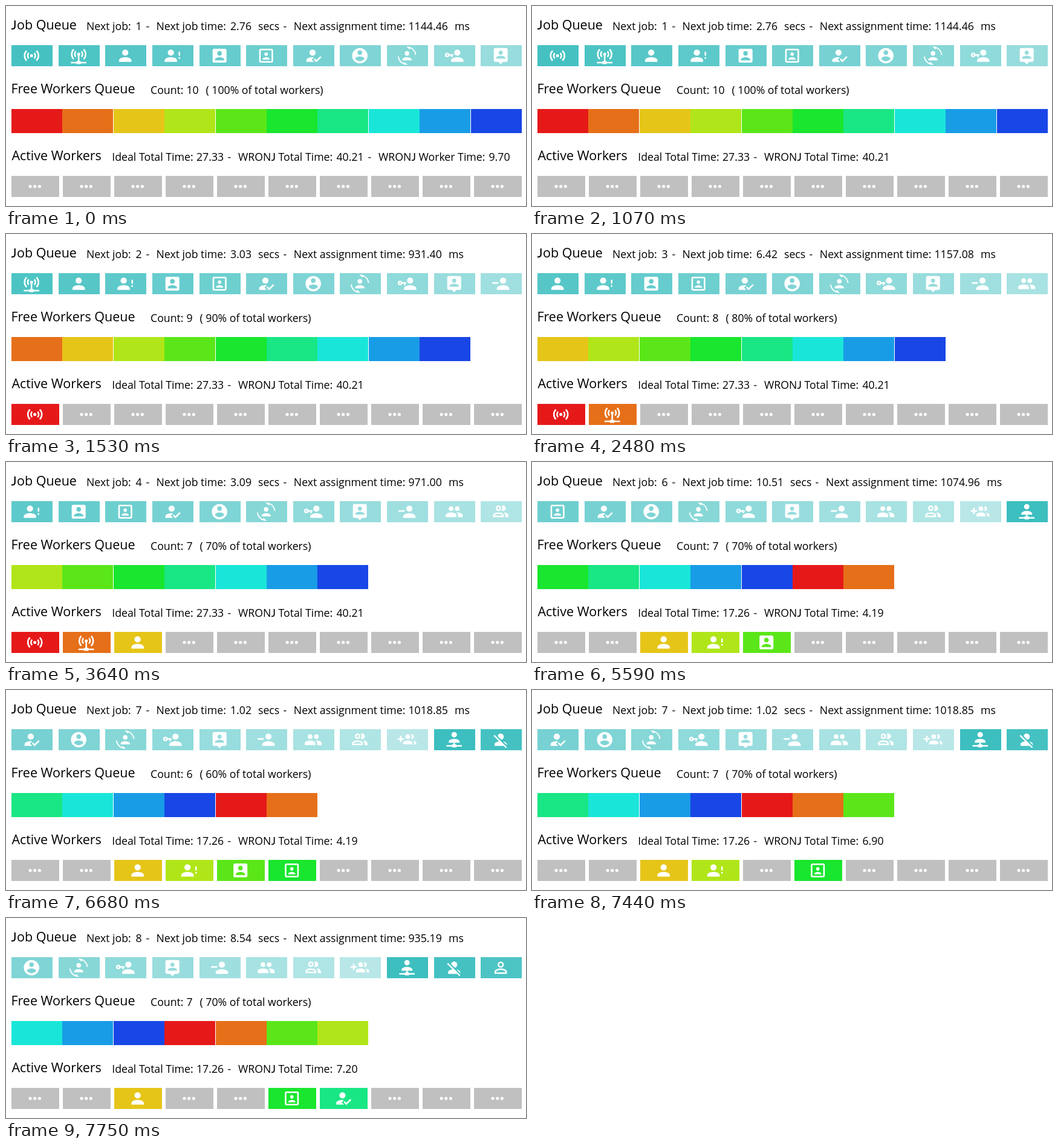
Animation of 860x332 px, one loop 8000 ms. Source, as an HTML page:

```html
<!DOCTYPE html>
<html lang="en">
<head>
<meta charset="utf-8">
<title>Job queue</title>
<style>
  html, body { margin: 0; width: 100%; height: 100%; overflow: hidden; background: #fff; }
  svg { display: block; }
  text { font: 17.7px "Open Sans", "Noto Sans", sans-serif; fill: #000; white-space: pre; }
  text.title { font-size: 21.5px; }
  .j { font-family: Lato, sans-serif; }
  .icon { fill: #fff; fill-rule: evenodd; }
  .line { fill: none; stroke: #fff; stroke-width: 2; }
</style>
</head>
<body>
<svg id="stage" width="860" height="332" viewBox="0 0 860 332"></svg>
<script>
const LOOP = 8000, WORKERS = 10, QUEUE = 11, DIGIT = 10.1;

// Icons on a 24-unit grid
const path = d => `<path d="${d}"/>`;
const rect = (x, y, w, h) => `<rect x="${x}" y="${y}" width="${w}" height="${h}"/>`;
const dot = (x, y, r) => `<circle cx="${x}" cy="${y}" r="${r}"/>`;
const person = x => dot(x, 8, 4) + path(`M${x} 14c4.42 0 8 1.79 8 4v2h-16v-2c0-2.21 3.58-4 8-4z`);
const slimPerson = x => dot(x, 8, 4) + path(`M${x} 14c-2.67 0-8 1.34-8 4v2h16v-2c0-2.66-5.33-4-8-4z`);
const bust = 'M15 9c0 1.66-1.34 3-3 3s-3-1.34-3-3 1.34-3 3-3 3 1.34 3 3zm-9 8c0-2 4-3.1 6-3.1s6 1.1 6 3.1v1H6z';
const waves = y => {
  const arc = (r, side) => {
    const k = r * Math.SQRT1_2;
    return `M${12 + side * k} ${y - k}A${r} ${r} 0 0 ${side > 0 ? 1 : 0} ${12 + side * k} ${y + k}`;
  };
  return dot(12, y, 2) + `<path class="line" d="${arc(5, 1)}${arc(5, -1)}${arc(9, 1)}${arc(9, -1)}"/>`;
};
const network = (top, y) => path(`M11 ${top}V${y}h-1a1 1 0 0 0-1 1H2v2h7a1 1 0 0 0 1 1h4a1 1 0 0 0 1-1h7v-2h-7a1 1 0 0 0-1-1h-1V${top}z`);

const ICONS = [
  waves(12),
  waves(10) + network(11, 19),
  person(12),
  person(10) + rect(20, 7, 2, 5) + rect(20, 14, 2, 2),
  path('M3 5v14a2 2 0 0 0 2 2h14c1.1 0 2-.9 2-2V5c0-1.1-.9-2-2-2H5a2 2 0 0 0-2 2z' + bust),
  path('M12 12.25c1.24 0 2.25-1.01 2.25-2.25S13.24 7.75 12 7.75 9.75 8.76 9.75 10s1.01 2.25 2.25 2.25zm4.5 4c0-1.5-3-2.25-4.5-2.25s-4.5.75-4.5 2.25V17h9v-.75zM19 3H5c-1.1 0-2 .9-2 2v14c0 1.1.9 2 2 2h14c1.1 0 2-.9 2-2V5c0-1.1-.9-2-2-2zm0 16H5V5h14v14z'),
  path('M21.1 12.5l1.4 1.41-6.53 6.59L12.5 17l1.4-1.41 2.07 2.08zM10 17l3 3H3v-2c0-2.21 3.58-4 8-4l1.89.11z') + dot(11, 8, 4),
  path('M12 2C6.48 2 2 6.48 2 12s4.48 10 10 10 10-4.48 10-10S17.52 2 12 2zm0 3c1.66 0 3 1.34 3 3s-1.34 3-3 3-3-1.34-3-3 1.34-3 3-3zm0 14.2c-2.5 0-4.71-1.28-6-3.22.03-1.99 4-3.08 6-3.08 1.99 0 5.97 1.09 6 3.08-1.29 1.94-3.5 3.22-6 3.22z'),
  path('M7.5 21.5l1.35-1.34 3.81 3.81L12 24C5.71 24 .56 19.16.05 13h1.5c.36 3.76 2.7 6.94 5.95 8.5zM16.5 2.5l-1.35 1.34L11.34.03 12 0c6.29 0 11.44 4.84 11.95 11h-1.5c-.36-3.76-2.7-6.93-5.95-8.5z' + bust),
  slimPerson(16) + `<circle class="line" cx="3" cy="11" r="2"/>` + rect(5, 10, 6, 2) + rect(8, 12, 2, 2),
  path('M19 2H5c-1.1 0-2 .9-2 2v14c0 1.1.9 2 2 2h4l3 3 3-3h4c1.1 0 2-.9 2-2V4c0-1.1-.9-2-2-2zm-7 3.3c1.49 0 2.7 1.21 2.7 2.7s-1.21 2.7-2.7 2.7-2.7-1.21-2.7-2.7 1.21-2.7 2.7-2.7zM18 16H6v-.9c0-2 4-3.1 6-3.1s6 1.1 6 3.1v.9z'),
  slimPerson(15) + rect(1, 10, 8, 2),
  dot(16, 8, 3) + dot(8, 8, 3) +
    path('M8 13c-2.33 0-7 1.17-7 3.5V19h14v-2.5c0-2.33-4.67-3.5-7-3.5zm8 0c-.29 0-.62.02-.97.05 1.16.84 1.97 1.97 1.97 3.45V19h6v-2.5c0-2.33-4.67-3.5-7-3.5z'),
  '<circle class="line" cx="9" cy="7.5" r="2.5"/>' +
    path('M13.07 10.41a5 5 0 0 0 0-5.82A3.4 3.4 0 0 1 15 4a3.5 3.5 0 0 1 0 7 3.4 3.4 0 0 1-1.93-.59zM16 17v2H2v-2s0-4 7-4 7 4 7 4zm-2 0c-.14-.78-1.33-2-5-2s-4.93 1.31-5 2zM15.95 13A5.32 5.32 0 0 1 18 17v2h4v-2s0-3.63-6.05-4z'),
  rect(0, 10, 8, 2) + rect(3, 7, 2, 8) + dot(13, 8, 3) +
    path('M18 11c1.66 0 3-1.34 3-3s-1.34-3-3-3c-.32 0-.63.05-.91.14.57.81.9 1.79.9 2.86s-.34 2.04-.9 2.86c.28.09.59.14.91.14zm1.62 2.16c.83.73 1.38 1.66 1.38 2.84v2h3v-2c0-1.54-2.37-2.49-4.38-2.84zM13 13c-2 0-6 1-6 3v2h12v-2c0-2-4-3-6-3z'),
  dot(12, 5.5, 3.5) + path('M5 16v-1.5C5 12.57 8.13 11 12 11s7 1.57 7 3.5V16z') + network(16, 18),
  path('M12 4a4 4 0 0 1 4 4c0 1.95-1.4 3.58-3.25 3.93L8.07 7.25C8.42 5.4 10.05 4 12 4zM12.28 14L20 21.72 18.73 23l-3-3H4v-2c0-1.84 2.5-3.39 5.87-3.86L2.78 7.05l1.27-1.27zM20 18v1.18l-4.86-4.86C18 14.93 20 16.35 20 18z'),
  '<circle class="line" cx="12" cy="8" r="3"/>' +
    path('M12 14.9c2.97 0 6.1 1.46 6.1 2.1v1.1H5.9V17c0-.64 3.13-2.1 6.1-2.1m0-1.9c-2.67 0-8 1.34-8 4v3h16v-3c0-2.66-5.33-4-8-4z'),
];
const IDLE = dot(6, 12, 2) + dot(12, 12, 2) + dot(18, 12, 2);

// Job length in seconds, then wait before assignment in ms
const JOBS = [
  ['2.76', '1144.46'], ['3.03', '931.40'], ['6.42', '1157.08'], ['3.09', '971.00'],
  ['1.87', '920.13'], ['10.51', '1074.96'], ['1.02', '1018.85'], ['8.54', '935.19'],
];

// An entry with a worker is a finished job, one without assigns the next job
const EVENTS = [
  { at: 1530 }, { at: 2480 }, { at: 3640 },
  { at: 4340, worker: 0, total: '3.22' },
  { at: 4660 },
  { at: 5510, worker: 1, total: '4.19' },
  { at: 5590 }, { at: 6680 },
  { at: 7440, worker: 4, total: '6.90' },
  { at: 7670 },
  { at: 7750, worker: 3, total: '7.20' },
];

function stateAt(time) {
  const s = { next: 0, free: [...Array(WORKERS).keys()], active: {}, ideal: '27.33', total: '40.21', started: time >= 1000 };
  for (const e of EVENTS) {
    if (e.at > time) break;
    if (e.total) {
      delete s.active[e.worker];
      s.free.push(e.worker);
      s.total = e.total;
      s.ideal = '17.26';
    } else {
      s.active[s.free.shift()] = s.next++;
    }
  }
  return s;
}

const workerColor = i => `hsl(${25.2 * i} 80% 50%)`;
const jobColor = i => {
  const fade = (i + 1) % 16 * .0425;
  const mix = c => Math.round(c + (255 - c) * fade);
  return `rgb(${mix(61)},${mix(190)},${mix(191)})`;
};

const box = (x, y, w, h, fill) => `<rect x="${Math.round(x)}" y="${y}" width="${w}" height="${h}" fill="${fill}"/>`;
const card = (x, y, w, fill, icon) => box(x, y, w, 35, fill) +
  `<g class="icon" transform="translate(${Math.round(x) + w / 2 - .8} ${y + 17.5}) scale(1.28) translate(-12 -12)">${icon}</g>`;
const text = (x, y, str, cls = '') =>
  `<text x="${x}" y="${y}" class="${cls}">${String(str).replace(/J/g, '<tspan class="j">J</tspan>')}</text>`;
const line = (y, ...parts) => parts.map(([x, str]) => text(x, y, str)).join('');

function draw(s) {
  const [length, wait] = JOBS[s.next];
  const shift = (length.length - 4) * DIGIT;
  const count = s.free.length;
  let out = text(8.6, 39, 'J', 'title') + text(17.9, 39, 'ob Queue', 'title') +
    line(40, [133, 'Next job:'], [214.5, s.next + 1], [231.5, '-'], [248.5, 'Next job time:'], [371, length],
      [417 + shift, 'secs'], [458.5 + shift, '-'], [475.8 + shift, 'Next assignment time:'],
      [665.5 + shift, wait], [732 + shift + (wait.length - 6) * DIGIT, 'ms']);
  for (let i = 0; i < QUEUE; i++) {
    const job = s.next + i;
    out += card(9.1 + 77.6 * i, 65, 68, jobColor(job), ICONS[job]);
  }

  out += text(8.4, 145, 'Free Workers Queue', 'title') +
    line(146, [239, 'Count:'], [298.5, count], [count > 9 ? 330.5 : 320.5, `( ${count * 10}% of total workers)`]);
  s.free.forEach((w, i) => out += box(9 + 84.4 * i, 171, 84, 40, workerColor(w)));

  out += text(9.4, 256, 'Active Workers', 'title') +
    line(257, [175.3, 'Ideal Total Time:'], [315, s.ideal], [366.5, '-'], [384, 'WRONJ Total Time:'], [546.5, s.total]);
  if (!s.started) out += line(257, [598.5, '-'], [616, 'WRONJ Worker Time:'], [798.5, '9.70']);
  for (let i = 0; i < WORKERS; i++) {
    const busy = i in s.active;
    out += card(9 + 85 * i, 282, 79, busy ? workerColor(i) : '#c0c0c0', busy ? ICONS[s.active[i]] : IDLE);
  }
  return out;
}

const stage = document.getElementById('stage');
let shown = '';
function tick() {
  const state = stateAt(performance.now() % LOOP);
  const key = JSON.stringify(state);
  if (key !== shown) {
    shown = key;
    stage.innerHTML = draw(state);
  }
  requestAnimationFrame(tick);
}
tick();
</script>
</body>
</html>
```
